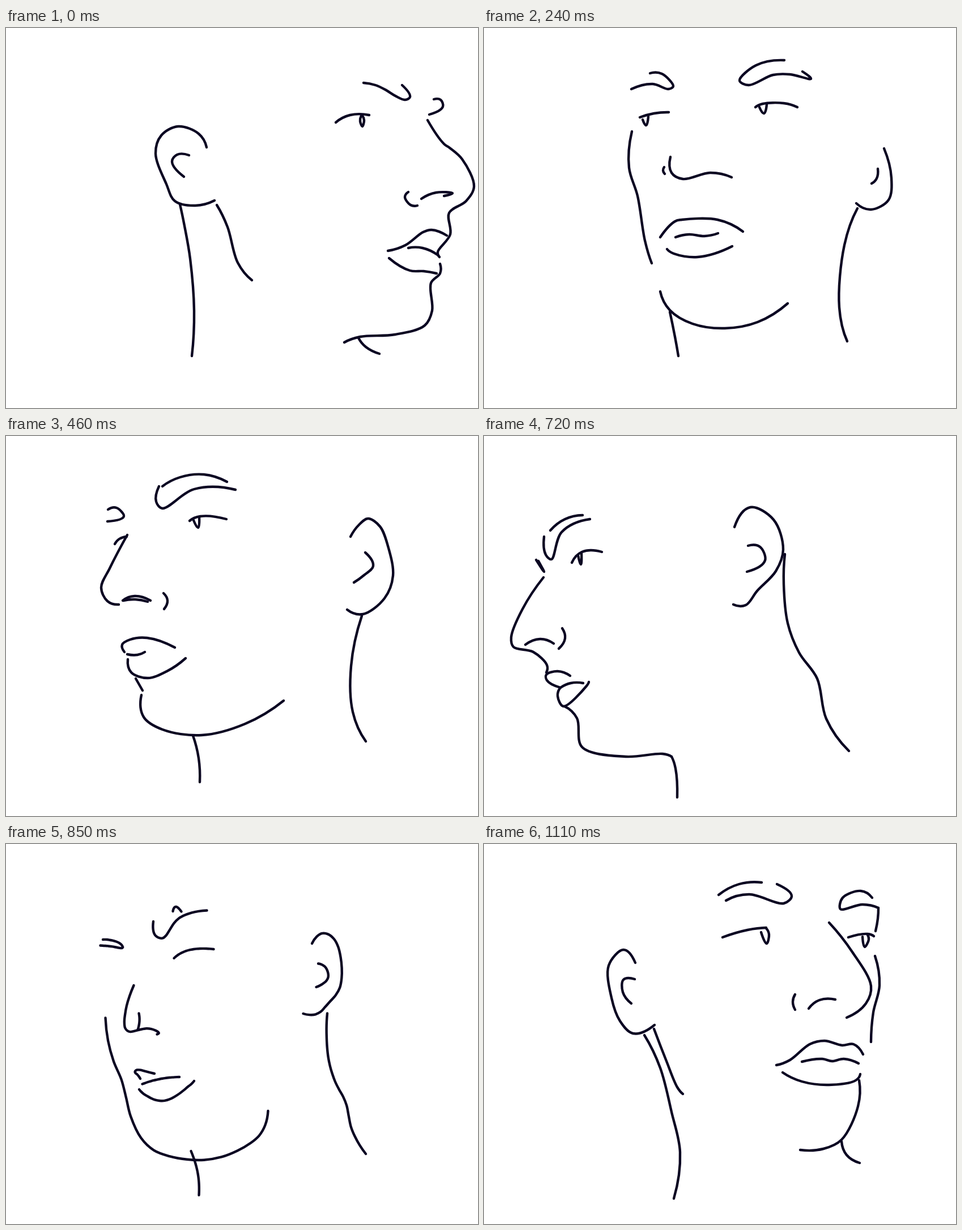
Write an HTML page with a canvas that moves like this. It is 833 by 672 pixels and loops after 1240 ms.

```html
<!DOCTYPE html>
<html lang="en">
<head>
<meta charset="utf-8">
<title>Turning head</title>
<style>
html, body { margin: 0; width: 100%; height: 100%; overflow: hidden; background: #fff; }
canvas { display: block; width: 833px; height: 672px; }
</style>
</head>
<body>
<canvas id="stage" width="833" height="672"></canvas>
<script>
const ctx = document.getElementById('stage').getContext('2d');
const LOOP = 1240;

// A stroke is a flat list of x,y key points; a pose is a set of named strokes.
const pairs = s => Array.from({ length: s.length / 2 }, (_, i) => [s[2 * i], s[2 * i + 1]]);
const combine = (a, b, f) => [f(a[0], b[0]), f(a[1], b[1])];

// Centripetal spline through the key points, as cubic Bezier segments.
function curve(stroke) {
  const p = pairs(stroke), n = p.length - 1;
  const gap = [], speed = [], slope = [];
  for (let i = 0; i < n; i++) {
    gap[i] = Math.sqrt(Math.hypot(p[i + 1][0] - p[i][0], p[i + 1][1] - p[i][1]));
    speed[i] = combine(p[i], p[i + 1], (a, b) => (b - a) / gap[i]);
  }
  for (let i = 1; i < n; i++) {
    const w = gap[i] / (gap[i - 1] + gap[i]);
    slope[i] = combine(speed[i - 1], speed[i], (a, b) => a * w + b * (1 - w));
  }
  const finish = (v, m) => combine(v, m || v, (a, b) => 2 * a - b);
  slope[0] = finish(speed[0], slope[1]);
  slope[n] = finish(speed[n - 1], n > 1 ? slope[n - 1] : null);
  return gap.map((g, i) => [
    p[i],
    combine(p[i], slope[i], (a, m) => a + m * g / 3),
    combine(p[i + 1], slope[i + 1], (a, m) => a - m * g / 3),
    p[i + 1]
  ]);
}

function pointOn(segments, u) {
  const i = Math.min(Math.floor(u * segments.length), segments.length - 1);
  const t = u * segments.length - i, r = 1 - t;
  const [a, b, c, d] = segments[i];
  return [0, 1].map(k =>
    r * r * r * a[k] + 3 * r * r * t * b[k] + 3 * r * t * t * c[k] + t * t * t * d[k]);
}

// Pose halfway between two others, from the strokes they share.
function halfway(from, to, steps = 16) {
  const pose = {};
  for (const name of Object.keys(from).filter(k => k in to)) {
    const a = curve(from[name]), b = curve(to[name]);
    pose[name] = Array.from({ length: steps + 1 }, (_, i) =>
      combine(pointOn(a, i / steps), pointOn(b, i / steps), (x, y) => (x + y) / 2)).flat();
  }
  return pose;
}

function mirror(pose, width, drop) {
  return Object.fromEntries(Object.entries(pose).map(([name, s]) =>
    [name, s.map((v, i) => i % 2 ? v + drop : width - v)]));
}

const rightProfile = {
  brow: [631,97, 652,101, 671,110, 687,120, 704,127, 713,122, 699,101],
  farBrow: [755,126, 767,127, 771,139, 747,153],
  eye: [582,167, 607,154, 641,154],
  pupil: [627,155, 625,165, 629,174, 632,163, 629,155],
  nose: [744,163, 773,205, 783,212, 805,232, 826,280, 812,306, 782,327, 784,365, 762,396, 765,405],
  wing: [710,290, 704,299, 714,313, 726,314],
  nostril: [733,302, 759,291, 788,292, 773,297],
  upperLip: [674,394, 705,384, 736,361, 751,357, 778,367],
  midLip: [710,389, 735,389, 763,402],
  lowerLip: [676,407, 713,429, 737,430, 760,434],
  jaw: [766,417, 766,434, 750,451, 752,500, 739,526, 687,542, 625,546, 597,556],
  neck: [622,548, 635,564, 659,576],
  ear: [354,211, 340,187, 304,174, 274,190, 264,222, 283,276, 298,306, 334,314, 368,305],
  innerEar: [323,225, 302,224, 293,236, 314,263],
  nape: [307,312, 315,350, 325,408, 332,500, 328,580],
  tendon: [372,313, 391,352, 409,415, 434,446]
};

const leftQuarter = {
  farBrow: [293,80, 314,81, 334,103, 325,108, 298,99, 260,108],
  farEye: [275,158, 300,151, 326,149],
  farPupil: [280,162, 286,172, 290,156],
  brow: [530,57, 480,66, 451,93, 467,101, 510,83, 540,82, 577,90, 562,77],
  eye: [479,140, 492,134, 529,133, 553,140],
  pupil: [486,140, 494,151, 499,135],
  cheek: [261,183, 256,247, 271,297, 284,376, 296,416],
  nose: [329,228, 331,256, 351,267, 399,256, 437,264],
  wing: [318,246, 316,252, 319,258],
  upperLip: [311,370, 337,342, 349,339, 412,339, 457,360],
  midLip: [338,370, 362,365, 389,368, 413,363],
  lowerLip: [323,391, 335,399, 377,405, 438,386],
  jaw: [311,466, 328,499, 368,523, 425,531, 483,520, 536,487],
  neck: [328,502, 337,546, 343,580],
  ear: [706,213, 719,265, 714,304, 683,321, 657,310],
  innerEar: [695,249, 693,266, 684,275],
  nape: [659,319, 636,384, 627,494, 641,554]
};

const leftTurn = {
  farBrow: [180,130, 195,127, 208,142, 179,151],
  browTop: [276,89, 307,73, 349,68, 390,81],
  browLow: [270,89, 265,116, 276,128, 332,94, 405,95],
  eye: [324,150, 343,142, 389,147],
  pupil: [331,149, 339,162, 341,143],
  bridge: [192,191, 200,182, 213,178],
  nose: [214,175, 183,234, 168,268, 179,292, 199,298],
  nostril: [206,291, 227,283, 255,291],
  nostrilBase: [207,291, 228,289, 250,293],
  wing: [278,278, 285,291, 279,306],
  upperLip: [209,382, 205,369, 219,360, 249,357, 298,374],
  midLip: [214,386, 232,387, 245,382],
  lowerLip: [215,395, 221,418, 250,428, 284,416, 317,393],
  crease: [229,429, 241,450],
  jaw: [239,458, 243,497, 276,519, 345,529, 422,509, 490,468],
  neck: [330,530, 340,570, 342,612],
  ear: [608,178, 623,157, 639,146, 660,160, 675,198, 683,247, 668,287, 630,315, 602,307],
  innerEar: [634,206, 648,230, 632,246, 614,259],
  nape: [628,318, 609,407, 612,488, 635,540]
};

const leftProfile = {
  browTop: [117,167, 143,147, 174,140],
  browLow: [106,178, 109,210, 119,218, 137,170, 187,147],
  farBrow: [92,219, 106,240, 96,221],
  eye: [155,224, 173,205, 208,205],
  pupil: [166,211, 171,227, 172,206],
  nose: [105,250, 68,306, 48,356, 52,373, 87,382, 111,405, 110,418],
  nostril: [73,369, 99,359, 123,367],
  wing: [138,340, 143,358, 132,376],
  upperLip: [152,424, 130,416, 110,422, 111,432, 135,445],
  midLip: [135,445, 153,437, 175,437],
  lowerLip: [134,446, 130,460, 140,478, 181,442, 185,435],
  jaw: [142,478, 164,499, 173,550, 250,567, 315,562, 331,567],
  neck: [331,567, 338,588, 341,639],
  ear: [442,161, 470,126, 511,148, 528,201, 515,239, 482,274, 462,299, 440,298],
  innerEar: [466,194, 487,196, 496,220, 464,240],
  nape: [531,209, 529,262, 536,331, 556,383, 588,429, 604,500, 644,557]
};

const front = {
  farBrow: [250,119, 266,107, 298,113, 306,128, 259,128, 237,138],
  farEye: [249,207, 301,195, 323,182, 318,168],
  browTop: [502,72, 457,75, 415,98],
  browLow: [414,96, 417,112, 434,115, 473,93, 522,88],
  lid: [424,152, 425,176, 429,182],
  eye: [438,180, 470,171, 525,167],
  jaw: [209,137, 216,255, 248,347, 268,423, 322,513, 369,541, 425,551, 487,539, 541,501, 578,456, 594,377],
  farEar: [215,258, 220,303, 224,343, 248,354],
  wing: [331,259, 328,269, 333,281],
  nose: [346,250, 357,292, 384,299, 415,275, 428,264, 423,255],
  upperLip: [322,406, 336,395, 357,370, 389,367],
  nearLip: [406,369, 434,361, 468,380],
  midLip: [346,404, 391,394, 437,387],
  lowerLip: [336,422, 384,434, 453,420, 479,403],
  ear: [638,191, 653,191, 656,225, 661,279, 644,299, 609,302],
  innerEar: [636,229, 642,248, 631,266],
  temple: [612,234, 609,290, 602,346],
  nape: [603,390, 606,458, 626,539],
  neck: [322,519, 339,577, 340,603]
};

const rightQuarter = {
  browTop: [414,90, 450,71, 490,68],
  browLow: [427,100, 468,89, 529,105, 543,92, 517,71],
  eye: [421,165, 465,152, 498,148],
  pupil: [489,156, 499,176, 503,160, 498,149],
  farBrow: [685,95, 665,83, 633,95, 629,115, 668,107, 696,113],
  farTemple: [696,113, 695,132, 691,154],
  farEye: [643,165, 677,159, 688,163],
  farPupil: [668,164, 672,182, 679,169, 677,161],
  nose: [609,139, 650,191, 683,251, 674,282, 640,307],
  cheek: [690,198, 698,250, 687,298, 683,350],
  wing: [549,266, 545,279, 549,293],
  nostril: [573,291, 592,276, 620,275],
  upperLip: [516,391, 540,382, 575,354, 601,348, 632,356, 652,354, 669,372],
  midLip: [561,385, 597,380, 614,384, 635,380, 661,388],
  lowerLip: [527,404, 561,420, 609,426, 656,418, 664,407],
  jaw: [662,418, 660,464, 631,523, 599,539, 558,541],
  neck: [631,526, 640,550, 663,564],
  ear: [267,210, 246,187, 220,215, 225,272, 240,313, 263,335, 301,320],
  innerEar: [266,239, 246,240, 245,262, 260,282],
  nape: [283,338, 311,396, 331,474, 346,545, 335,627],
  tendon: [300,327, 322,384, 341,430, 351,442]
};

// Each pose with the moment it gives way to the next.
const schedule = [
  [120, rightProfile], [240, mirror(front, 906, 1)], [460, leftQuarter],
  [590, leftTurn], [720, halfway(leftTurn, leftProfile)], [850, leftProfile],
  [980, halfway(leftProfile, front)], [1110, front], [LOOP, rightQuarter]
];

function draw(pose) {
  ctx.fillStyle = '#fff';
  ctx.fillRect(0, 0, 833, 672);
  ctx.strokeStyle = '#0b0622';
  ctx.lineWidth = 4.4;
  ctx.lineCap = ctx.lineJoin = 'round';
  for (const stroke of Object.values(pose)) {
    ctx.beginPath();
    ctx.moveTo(stroke[0], stroke[1]);
    for (const [, b, c, d] of curve(stroke)) ctx.bezierCurveTo(...b, ...c, ...d);
    ctx.stroke();
  }
}

const start = performance.now();
function tick() {
  const t = (performance.now() - start) % LOOP;
  draw(schedule.find(([end]) => t < end)[1]);
  requestAnimationFrame(tick);
}
tick();
</script>
</body>
</html>
```
